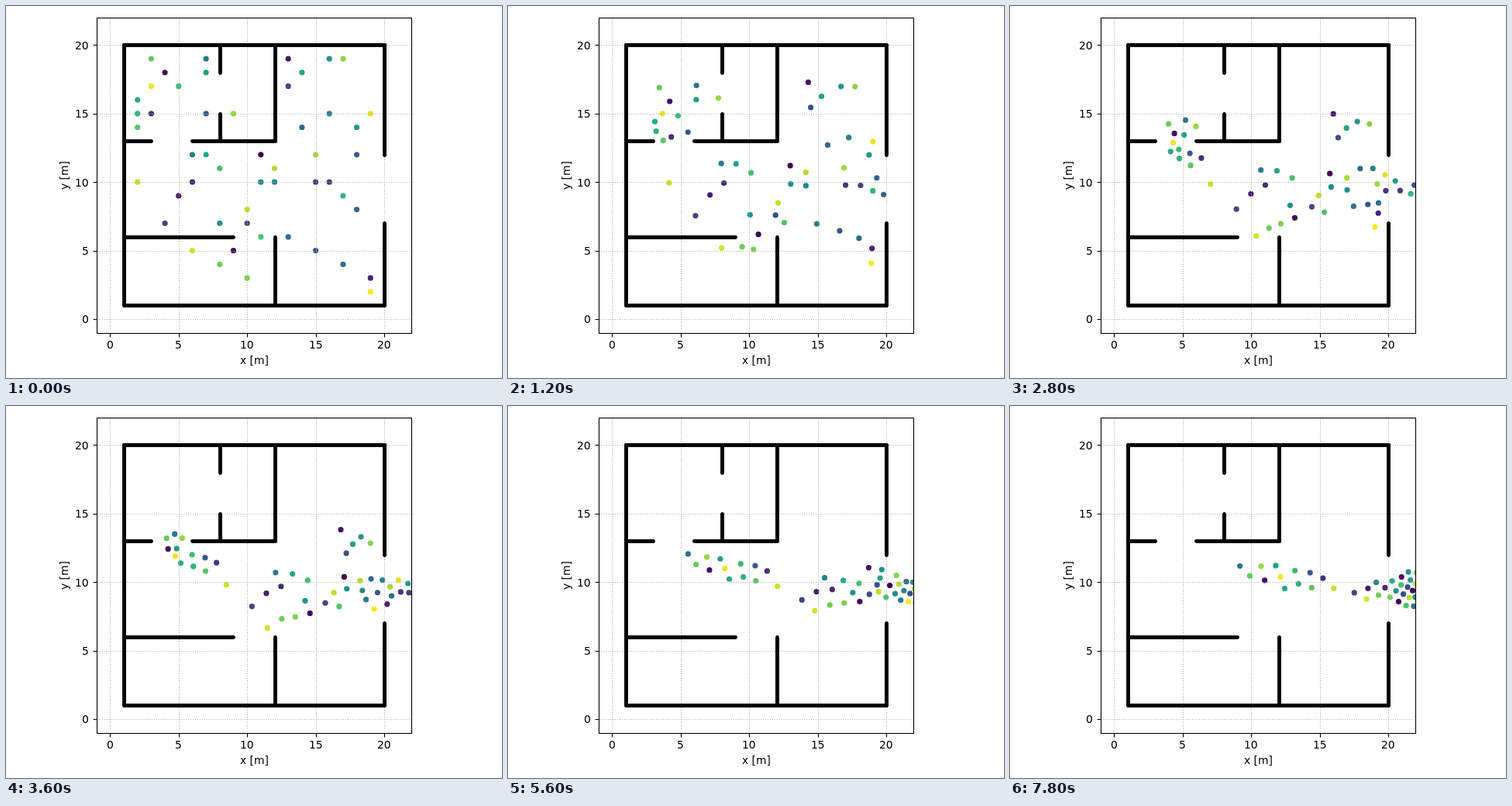
An HTML page with a canvas for the animation above (8000 ms loop, 640x480 px).

```html
<!DOCTYPE html>
<html lang="en">
<head>
<meta charset="utf-8">
<title>Room evacuation</title>
<style>
  html, body { margin: 0; width: 100%; height: 100%; overflow: hidden; background: #fff; }
  canvas { display: block; width: 100vw; height: 100vh; }
</style>
</head>
<body>
<canvas id="stage" width="640" height="480"></canvas>
<script>
const ctx = document.getElementById('stage').getContext('2d');
const LOOP = 8000, STEP = 200, SUBSTEPS = 10;
const BOX = { left: 117.5, top: 15.5, right: 523.5, bottom: 422.5 };
const TICKS = [0, 5, 10, 15, 20];
const FONT = '13.89px "DejaVu Sans", sans-serif';
const px = x => 134.35 + 17.68 * x;
const py = y => 404 - 17.68 * y;
const snap = v => Math.round(v) + 0.5;

// Walking model, in metres and seconds
const SPEED = 1.8;
const CROWD = { strength: 18, range: 0.2 };
const WALL = { strength: 5, range: 0.4 };
const CLOSET_DOOR = [7.8, 16.5], WEST_DOOR = [4.5, 12], SOUTH_DOOR = [10.5, 6.5];
const EXIT = [20, 9.5], MEETING_POINT = [22.3, 9.4];

// Walls: x1, y1, x2, y2
const WALLS = [
  [1, 1, 20, 1], [1, 20, 20, 20], [1, 1, 1, 20],
  [20, 1, 20, 7], [20, 12, 20, 20],
  [8, 20, 8, 18], [8, 15, 8, 13], [12, 20, 12, 13],
  [1, 13, 3, 13], [6, 13, 12, 13], [1, 6, 9, 6], [12, 1, 12, 6]
];

// Starting places, in order of colour from dark to bright
const STARTS = [
  [11, 12], [9, 5], [4, 18], [13, 19], [5, 9], [19, 3], [6, 10], [3, 15], [15, 10],
  [16, 10], [4, 7], [10, 7], [13, 17], [15, 5], [7, 15], [18, 12], [18, 8], [14, 14],
  [17, 4], [7, 19], [13, 6], [6, 12], [16, 15], [12, 10], [11, 10], [8, 7], [16, 19],
  [18, 14], [7, 18], [14, 18], [7, 12], [2, 16], [2, 15], [17, 9], [5, 17], [8, 11],
  [11, 6], [2, 14], [3, 19], [8, 4], [10, 3], [17, 19], [9, 15], [15, 12], [12, 11],
  [10, 8], [2, 10], [6, 5], [19, 15], [3, 17], [19, 2]
];

const VIRIDIS = ['440154', '482475', '414487', '355f8d', '2a788e', '21918c',
                 '22a884', '44bf70', '7ad151', 'bddf26', 'fde725'];

function viridis(level) {
  const i = Math.min(9, Math.floor(level * 10)), f = level * 10 - i;
  const channel = (hex, k) => parseInt(hex.slice(k, k + 2), 16);
  const mix = k => {
    const a = channel(VIRIDIS[i], k), b = channel(VIRIDIS[i + 1], k);
    return Math.round(a + (b - a) * f);
  };
  return `rgb(${mix(0)},${mix(2)},${mix(4)})`;
}

const COLORS = STARTS.map((_, i) => viridis(i / (STARTS.length - 1)));

function nextTarget([x, y]) {
  if (y > 13 && x > 8 && x < 12) return CLOSET_DOOR;
  if (y > 12.3 && x < 8) return WEST_DOOR;
  if (y < 6 && x < 12) return SOUTH_DOOR;
  return x < 19.5 ? EXIT : MEETING_POINT;
}

function nearestOnWall([x, y], [x1, y1, x2, y2]) {
  const dx = x2 - x1, dy = y2 - y1;
  const u = ((x - x1) * dx + (y - y1) * dy) / (dx * dx + dy * dy);
  const k = Math.max(0, Math.min(1, u));
  return [x1 + k * dx, y1 + k * dy];
}

function velocity(me, crowd) {
  const target = nextTarget(me);
  const dx = target[0] - me[0], dy = target[1] - me[1];
  const pull = SPEED / Math.max(0.3, Math.hypot(dx, dy));
  let vx = dx * pull, vy = dy * pull;

  const avoid = (point, { strength, range }) => {
    const ax = me[0] - point[0], ay = me[1] - point[1];
    const d = Math.hypot(ax, ay) || 0.001;
    const push = strength * Math.exp(-d / range) / d;
    vx += ax * push;
    vy += ay * push;
  };
  for (const other of crowd) if (other !== me) avoid(other, CROWD);
  for (const wall of WALLS) avoid(nearestOnWall(me, wall), WALL);

  const limit = Math.min(1, SPEED / Math.hypot(vx, vy));
  return [vx * limit, vy * limit];
}

// The crowd's places at every step of the loop
function simulate() {
  const dt = STEP / 1000 / SUBSTEPS;
  const history = [STARTS];
  let crowd = STARTS;
  while (history.length < LOOP / STEP) {
    for (let i = 0; i < SUBSTEPS; i++) {
      crowd = crowd.map(me => {
        const [vx, vy] = velocity(me, crowd);
        return [me[0] + vx * dt, me[1] + vy * dt];
      });
    }
    history.push(crowd);
  }
  return history;
}

const history40 = simulate();

function line(x1, y1, x2, y2) {
  ctx.beginPath();
  ctx.moveTo(x1, y1);
  ctx.lineTo(x2, y2);
  ctx.stroke();
}

function drawCrowd(crowd) {
  ctx.save();
  ctx.beginPath();
  ctx.rect(BOX.left, BOX.top, BOX.right - BOX.left, BOX.bottom - BOX.top);
  ctx.clip();
  crowd.forEach(([x, y], i) => {
    ctx.fillStyle = COLORS[i];
    ctx.beginPath();
    ctx.arc(px(x), py(y), 3.6, 0, 2 * Math.PI);
    ctx.fill();
  });
  ctx.restore();
}

function drawGrid() {
  ctx.strokeStyle = '#b0b0b0';
  ctx.lineWidth = 1.1;
  ctx.lineCap = 'butt';
  ctx.setLineDash([1.11, 1.83]);
  for (const v of TICKS) {
    line(snap(px(v)), BOX.bottom, snap(px(v)), BOX.top);
    line(BOX.left, snap(py(v)), BOX.right, snap(py(v)));
  }
  ctx.setLineDash([]);
}

function drawWalls() {
  ctx.strokeStyle = '#000';
  ctx.lineWidth = 4.9;
  ctx.lineCap = 'round';
  for (const [x1, y1, x2, y2] of WALLS) {
    line(snap(px(x1)), snap(py(y1)), snap(px(x2)), snap(py(y2)));
  }
}

// Text on whole pixels; align is the share of its width left of x
function label(text, x, y, align) {
  const left = x - ctx.measureText(text).width * align;
  ctx.fillText(text, Math.round(left), Math.round(y));
}

function drawAxes() {
  ctx.strokeStyle = ctx.fillStyle = '#000';
  ctx.lineWidth = 1.1;
  ctx.lineCap = 'butt';
  ctx.font = FONT;
  ctx.strokeRect(BOX.left, BOX.top, BOX.right - BOX.left, BOX.bottom - BOX.top);
  for (const v of TICKS) {
    const x = snap(px(v)), y = snap(py(v));
    line(x, BOX.bottom, x, BOX.bottom + 5);
    line(BOX.left - 5, y, BOX.left, y);
    label(v, px(v), 442, 0.5);
    label(v, 107, py(v) + 5.3, 1);
  }
  label('x [m]', 320, 462, 0.5);
  ctx.save();
  ctx.translate(80, 219);
  ctx.rotate(-Math.PI / 2);
  label('y [m]', 0, 0, 0.5);
  ctx.restore();
}

function frame(now) {
  ctx.fillStyle = '#fff';
  ctx.fillRect(0, 0, 640, 480);
  drawCrowd(history40[Math.floor((now % LOOP) / STEP)]);
  drawGrid();
  drawWalls();
  drawAxes();
  requestAnimationFrame(frame);
}
frame(0);
</script>
</body>
</html>
```
